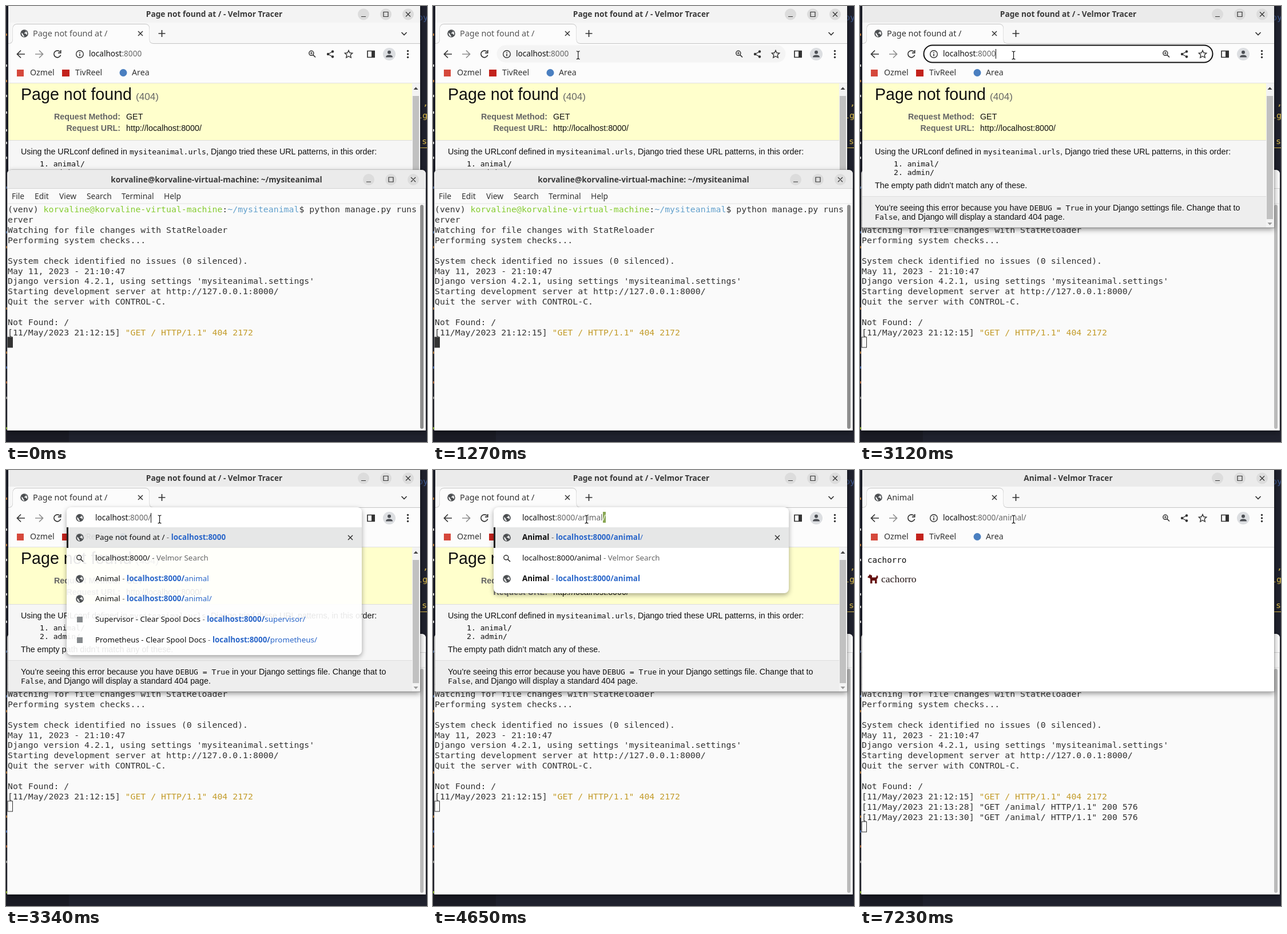
Write an HTML page that moves like this. It is 736x761 px and loops after 8000 ms.

```html
<!DOCTYPE html>
<html lang="en">
<head>
<meta charset="utf-8">
<title>Page not found</title>
<style>
html, body { margin: 0; width: 100%; height: 100%; overflow: hidden; background: #20222e; }
#stage { position: relative; width: 736px; height: 761px; overflow: hidden; font-family: "Noto Sans", sans-serif; }
#stage > svg, .win, .win > svg { position: absolute; left: 0; top: 0; width: 736px; height: 761px; }
text { white-space: pre; fill: #333; }
.ui { font-size: 13.8px; }
.mark { font-size: 14.2px; }
.title { font-size: 13.7px; font-weight: 700; text-anchor: middle; fill: #3a3a3a; }
.tab { font-size: 14.4px; }
.page { font: 14.3px "Liberation Sans", sans-serif; fill: #111; }
.label { font-weight: 700; fill: #666; text-anchor: end; }
.code { font: 13.1px "DejaVu Sans Mono", monospace; fill: #111; }
.term { font: 14.85px "DejaVu Sans Mono", monospace; fill: #333; }
.line { fill: none; stroke: #333; stroke-width: 1.7; }
.shadow { stroke: rgba(0, 0, 0, .25); filter: drop-shadow(0 3px 5px rgba(0, 0, 0, .42)); }
#animalName { font: 17.6px "Liberation Serif", serif; fill: #201010; }
#address { position: absolute; top: 74px; line-height: 18px; font-size: 13.6px; white-space: pre; color: #666; }
#address em { font-style: normal; color: #111; }
#address mark { background: #88a653; color: #fff; }
#address mark em { color: #fff; }
#address i { display: inline-block; width: 1px; height: 17px; margin-right: -1px; background: #111; vertical-align: -4px; }
#drop { position: absolute; left: 106px; top: 65px; width: 516px; border-radius: 8px; box-shadow: 0 3px 9px rgba(0, 0, 0, .35); overflow: hidden; }
#rows { position: absolute; top: 35px; width: 100%; }
#rows div { position: relative; height: 35.8px; line-height: 35px; padding-left: 50px; font-size: 13.4px; color: #111; white-space: pre; }
#rows div:first-child { background: rgba(30, 40, 40, .11); box-shadow: inset 3px 0 #222; }
#rows svg { position: absolute; left: 15px; top: 10px; width: 16px; height: 16px; overflow: visible; }
#rows svg + svg { left: 488px; }
#rows s { color: #666; text-decoration: none; }
#rows u { color: #2a66c9; text-decoration: none; }
#pointer { z-index: 3; overflow: visible; }
</style>
</head>
<body>
<div id="stage"></div>
<script>
const LOOP = 8000;
const USER = 'korvaline';
const BROWSER = 'Velmor Tracer';
const SEARCH = 'Velmor Search';
const HOST = 'localhost:8000/';

const text = (x, y, body, cls = 'ui', extra = '') => `<text x="${x}" y="${y}" class="${cls}" ${extra}>${body}</text>`;
const rect = (x, y, w, h, fill, extra = '') => `<rect x="${x}" y="${y}" width="${w}" height="${h}" fill="${fill}" ${extra}/>`;
const line = (d, extra = '') => `<path class="line" d="${d}" ${extra}/>`;
const dot = (x, y, r, fill) => `<circle cx="${x}" cy="${y}" r="${r}" fill="${fill}"/>`;
const icon = (id, x, y) => `<use href="#${id}" x="${x}" y="${y}"/>`;
const span = (fill, body) => `<tspan style="fill:${fill}">${body}</tspan>`;
const code = body => `<tspan class="code">${body}</tspan>`;

const windowButtons = (x, y) => [0, 39, 78].map(dx => dot(x + dx, y, 10, '#dcdcdc')).join('') +
  line(`M${x - 4} ${y + 4}h8M${x + 35} ${y - 4}h8v8h-8zM${x + 74} ${y - 4}l8 8m0-8l-8 8`, 'style="stroke-width:1.2"');

const symbols = `<defs>
  <g id="globe">${dot(0, 0, 6.8, '#4c4f52')}
    <path fill="#f4f4f4" d="M-4.8-1.5l3 2.6v1.6l1.6 1v2Q-5 4.8-4.8-1.5zM0-5.3l3.2.9-.6 2-2.3 1v1.6h2.5l1 2.4 1-.8Q6.4-3.5 0-5.3z"/></g>
  <g id="lens"><circle class="line" cx="-1.2" cy="-1.2" r="4" style="stroke-width:1.5"/>${line('M1.8 1.8L6 6')}</g>
  <g id="cross">${line('M-4-4L4 4M4-4L-4 4', 'style="stroke-width:1.5"')}</g>
  <g id="doc">${rect(-5, -5, 10, 10, '#85898c')}</g>
  <g id="info"><circle class="line" r="6.3" style="stroke-width:1.4"/>${line('M0-3.5v1.7M0-.6v4.1')}</g>
</defs>`;

// Slivers of the editor behind the two windows
const slivers = [[50, '#c8823c'], [104, '#ddd'], [131, '#c8823c'], [157, '#ddd'], [186, '#ddd'], [217, '#ddd'],
  [239, '#ddd'], [265, '#ddd'], [317, '#5b7fb8'], [395, '#5b7fb8'], [421, '#c8823c'], [528, '#c8823c'],
  [605, '#c8823c'], [631, '#4a78d0'], [657, '#c8703c'], [684, '#aaa'], [737, '#9cc832']];
const backdrop = `<svg>${symbols}${rect(0, 0, 736, 761, '#20222e')}${rect(0, 741, 110, 20, '#1b1c25')}
  ${slivers.map(([y, color]) => rect(0, y - 2, 2, 4, color)).join('')}
  ${text(720, 25, span('#3e5a92', 'py'), 'term')}
  ${[[729, 174, ','], [719, 196, 'lg'], [727, 241, 'so']].map(([x, y, s]) => text(x, y, span('#e0c04c', s), 'term')).join('')}
  ${rect(724, 247, 12, 1, '#e0c04c')}</svg>`;

const tabEdge = 'M4 65.5Q12 65.5 12 58V39Q12 31.5 20 31.5H243Q250.5 31.5 250.5 39V58Q250.5 65.5 258 65.5';
const toolbar = `
  ${rect(4, 29, 720, 37, '#f8f8f8')}${rect(4, 65, 720, 70, '#fcfcfc')}
  <path d="${tabEdge}H724" fill="none" stroke="#c4c4c4"/><path d="${tabEdge}" fill="#fcfcfc" transform="translate(0 1)"/>
  ${icon('globe', 32, 48)}${icon('cross', 235, 48)}
  ${line('M266.5 48h12M272.5 42v12M691.5 46l4.5 4.5 4.5-4.5')}
  ${line('M33 84H20M26 77.5L19.5 84L26 90.5')}${line('M51 84H64M58 77.5L64.5 84L58 90.5', 'style="stroke:#8e8e8e"')}
  ${line('M94.5 80A6 6 0 1 0 95.6 85.5M95.7 77v4.8h-4.8')}
  <g id="addressBar"><rect id="pill" x="111.5" y="68.5" width="505" height="30" rx="15" stroke-width="2"/>
    ${icon('info', 129, 84)}
    ${icon('lens', 535, 83.5)}${line('M531.6 82.3h4.4M533.8 80.1v4.4', 'style="stroke-width:1.1"')}
    ${dot(563, 84, 2.2, '#333')}${dot(571, 79.5, 2.2, '#333')}${dot(571, 88.5, 2.2, '#333')}
    ${line('M571 79.5L563 84L571 88.5', 'style="stroke-width:1.3"')}
    ${line('M599 77.5l2 4.3 4.7.5-3.5 3.2 1 4.6-4.2-2.4-4.2 2.4 1-4.6-3.5-3.2 4.7-.5z', 'style="stroke-width:1.4"')}</g>
  ${line('M632 78.5h12v11h-12z')}${rect(639, 78, 6, 12, '#333')}
  ${dot(670, 84, 11, '#dcdee1')}${dot(670, 80.7, 3, '#4c4f54')}<path d="M664 89.5Q664 85.5 670 85.5T676 89.5z" fill="#4c4f54"/>
  ${[78.5, 84, 89.5].map(y => dot(702.5, y, 1.7, '#333')).join('')}
  ${rect(19, 111, 12, 12, '#d5483b')}${text(42, 121, 'Ozmel', 'mark')}
  ${rect(98, 111, 13, 12, '#c3221c')}${text(121, 121, 'TivReel', 'mark')}
  ${dot(205, 116.5, 6.5, '#4a7fc0')}${text(220, 121, 'Area', 'mark')}
  ${rect(4, 134.5, 720, 1, '#c8c8c8')}`;

const errorPage = `<g id="errorPage">
  ${rect(4, 135, 706, 99, '#ffffcc')}${rect(4, 234, 706, 1, '#ddd')}
  ${rect(4, 235, 706, 97, '#f6f6f6')}${rect(4, 332, 706, 1, '#ddd')}${rect(4, 333, 706, 54, '#eee')}
  ${rect(710, 135, 14, 252, '#f3f3f3')}${rect(711, 157, 11, 215, '#c1c1c1')}
  <path d="M712.5 146h8l-4-4.5z" fill="#444"/><path d="M712.5 378h8l-4 4.5z" fill="#999"/>
  ${text(26, 164, 'Page not found', 'page', 'style="font-size:28.6px"')}
  ${text(227, 164, '(404)', 'page', 'style="font-size:17.16px;fill:#666"')}
  ${text(200, 198, 'Request Method:', 'page label')}${text(210, 198, 'GET', 'page')}
  ${text(200, 218, 'Request URL:', 'page label')}${text(210, 218, 'http://localhost:8000/', 'page')}
  ${text(26, 259, `Using the URLconf defined in ${code('mysiteanimal.urls')}, Django tried these URL patterns, in this order:`, 'page')}
  ${text(59, 280, '1. animal/', 'code')}${text(59, 295, '2. admin/', 'code')}
  ${text(26, 318, 'The empty path didn’t match any of these.', 'page')}
  ${text(26, 357, `You’re seeing this error because you have ${code('DEBUG = True')} in your Django settings file. Change that to`, 'page')}
  ${text(26, 373, `${code('False')}, and Django will display a standard 404 page.`, 'page')}</g>`;

const animalPage = `<g id="animalPage">${rect(4, 135.5, 720, 252, '#fff')}
  ${text(13, 162, 'cachorro', 'code', 'style="font-size:14.2px"')}
  ${text(24, 196, 'cachorro', '', 'id="animalName"')}
  <path id="dog" fill="#651212" d="M13.5 187.5q-.5-2 1.5-2.5l2-3 2 1.5 2 .5v3.5h6.5q1.5-.5 1.5-3.5 2.5 0 2.5 2.5 0 2.5-2 3.5v8h-3.5v-5h-4.5v5h-3.5v-7.5l-1-2q-3 0-3.5-1z"/></g>`;

const browser = `<div class="win" id="browser"><svg>
  ${rect(4, -12, 720, 399, '#fff', 'class="shadow"')}<rect id="titleBar" x="4" width="720" height="29"/>
  ${text(364, 19, '', 'title', 'id="pageTitle"')}${windowButtons(625, 14.5)}
  ${toolbar}${text(47, 53, '', 'tab', 'id="tabTitle"')}${errorPage}${animalPage}
  ${rect(4, 386.5, 720, 1, '#9a9a9a')}</svg>
  <div id="drop"><div id="rows"></div></div><div id="address"></div>
  <svg id="dropIcon">${icon('globe', 129, 83.5)}</svg></div>`;

const termLines = [
  `(venv) ${span('#85cc30', `${USER}@${USER}-virtual-machine`)}:${span('#62a0cc', '~/mysiteanimal')}$ python manage.py runs`,
  'erver', 'Watching for file changes with StatReloader', 'Performing system checks...', '',
  'System check identified no issues (0 silenced).', 'May 11, 2023 - 21:10:47',
  "Django version 4.2.1, using settings 'mysiteanimal.settings'",
  'Starting development server at http://127.0.0.1:8000/', 'Quit the server with CONTROL-C.', '', 'Not Found: /',
  `[11/May/2023 21:12:15] ${span('#c39c2a', '"GET / HTTP/1.1" 404 2172')}`,
  '[11/May/2023 21:13:28] "GET /animal/ HTTP/1.1" 200 576',
  '[11/May/2023 21:13:30] "GET /animal/ HTTP/1.1" 200 576'];
const termY = row => 360 + row * 17.92;
const menu = [[10, 'File'], [50, 'Edit'], [93, 'View'], [141, 'Search'], [202, 'Terminal'], [276, 'Help']];

const terminal = `<div class="win" id="terminal"><svg>
  <path class="shadow" d="M2 741V294Q2 286 10 286H726Q734 286 734 294V741z" fill="#fafafa"/>
  <path id="termBar" d="M2 318V294Q2 286 10 286H726Q734 286 734 294V318z"/>
  ${rect(2, 318, 732, 1, '#d4d4d4')}${rect(2, 344.5, 732, 1, '#e2e2e2')}
  ${text(368, 307.5, `${USER}@${USER}-virtual-machine: ~/mysiteanimal`, 'title')}${windowButtons(634, 303)}
  ${menu.map(([x, s]) => text(x, 337, s)).join('')}
  ${termLines.map((s, i) => text(3, termY(i).toFixed(1), s, 'term', `id="term${i}"`)).join('')}
  <rect id="termCursor" x="3" width="8.5" height="18" stroke="#333"/>
  <rect id="termScroll" x="724" y="347" width="6" height="391" rx="3"/></svg></div>`;

const beam = 'M-3-7Q0-7 0-5V5Q0 7-3 7M3-7Q0-7 0-5M0 5Q0 7 3 7';
const pointer = `<svg id="pointer">
  <path id="hand" d="M-2 14V1.5Q-2-.5 0-.5T2 1.5V8Q4 7 5.5 8.5Q7.5 8 8.5 9.5Q11.5 9 11.5 12V16Q11 19 9 22.5H-.5Q-3 17-6 13.5Q-6.5 10.5-4 11.5zM2 8v4M5.5 8.5v4M8.5 9.5v3" fill="#fff" stroke="#111" stroke-width="1.2"/>
  <path id="arrow" d="M0 0V17L4 13.5L6.5 19.5L9 18.5L6.5 12.5H12z" fill="#111" stroke="#fff"/>
  <g id="beam" fill="none"><path d="${beam}" stroke="#fff" stroke-width="3"/><path d="${beam}" stroke="#111" stroke-width="1.2"/></g></svg>`;

document.getElementById('stage').innerHTML = backdrop + browser + terminal + pointer;
const $ = id => document.getElementById(id);
const show = (id, on) => { $(id).style.display = on ? '' : 'none'; };
const fill = (id, color) => { $(id).style.fill = color; };
const setHtml = (id, html) => { const el = $(id); if (el.shown !== html) el.innerHTML = el.shown = html; };

// Last value in a [time, value] table whose time has come
const at = (table, t) => table.reduce((value, [time, next]) => t >= time ? next : value, table[0][1]);

const RAISE = 1510, SELECT = 1590, OPEN = 3290, LOAD = 5480, RELOAD = 7140, DOG = 7190;
const typed = [[OPEN, ''], [3500, 'a'], [3600, 'an'], [3700, 'ani'], [3870, 'anim'], [4030, 'anima'], [4650, 'animal']];
const dropFade = [[0, 0], [OPEN, .45], [3340, .9], [3380, 1], [LOAD, .13], [5530, 0]];
const path = [[100, 672, 750], [220, 638, 708], [350, 560, 635], [510, 335, 430], [620, 222, 180], [720, 195, 98],
  [750, 193, 94], [880, 196, 90], [920, 206, 85], [1100, 238, 83], [1350, 261, 87], [1840, 261, 87], [1920, 268.5, 86]];

function position(t) {
  const i = path.findIndex(p => p[0] > t);
  if (i < 0) return path.at(-1).slice(1);
  const [t0, x0, y0] = path[i - 1], [t1, x1, y1] = path[i], k = (t - t0) / (t1 - t0);
  return [x0 + (x1 - x0) * k, y0 + (y1 - y0) * k];
}

function suggestions(part) {
  const bold = (s, n) => `<b>${s.slice(0, n)}</b>${s.slice(n)}`;
  const page = (name, url) => `${bold(name, name === 'Animal' ? part.length : 0)}<s> - </s><u>${bold(HOST + url, HOST.length + part.length)}</u>`;
  const search = ['lens', `${HOST + part}<s> - ${SEARCH}</s>`];
  if (!part) return [['globe', 'Page not found at /<s> - </s><u><b>localhost:8000</b></u>'], search,
    ['globe', page('Animal', 'animal')], ['globe', page('Animal', 'animal/')],
    ['doc', page('Supervisor - Clear Spool Docs', 'supervisor/')], ['doc', page('Prometheus - Clear Spool Docs', 'prometheus/')]];
  const rows = [['globe', page('Animal', 'animal/')], search, ['globe', page('Animal', 'animal')]];
  if (part !== 'animal') rows.splice(2, 0, ['globe', `<u><b>${HOST + part}</b></u>`]);
  return rows;
}

function address(t) {
  const host = '<em>localhost</em>:8000';
  if (t >= LOAD) return host + '/animal/';
  if (t >= OPEN) {
    const part = at(typed, t);
    return `${host}/${part}` + (part ? `<mark>${'animal/'.slice(part.length)}</mark>` : '<i></i>');
  }
  if (t >= 2130) return host + (t < 2630 || t >= 3120 ? '<i></i>' : '');
  return t >= SELECT ? `<mark>${host}</mark>` : host;
}

function drawBrowser(t) {
  const loaded = t >= LOAD, open = t >= OPEN && !loaded, focused = t >= RAISE && !loaded;
  const name = loaded ? 'Animal' : 'Page not found at /';
  setHtml('pageTitle', `${name} - ${BROWSER}`);
  setHtml('tabTitle', name);
  fill('titleBar', t < RAISE ? '#f3f3f3' : '#ebebeb');
  fill('tabTitle', t < RAISE ? '#555' : '#333');
  show('errorPage', !loaded);
  show('animalPage', loaded);
  show('dog', t >= DOG);
  $('animalName').setAttribute('x', t >= DOG ? 37 : 24);
  fill('pill', focused ? '#fff' : t >= 960 && !loaded ? '#f4f4f4' : 'none');
  $('pill').style.stroke = focused ? '#111' : 'none';
  show('addressBar', !open);
  show('dropIcon', open);
  setHtml('address', address(t));
  $('address').style.left = (open ? 156 : 145) + 'px';

  const rows = suggestions(at(typed, t)), fade = at(dropFade, t);
  show('drop', fade > 0);
  $('drop').style.opacity = open ? 1 : fade;
  $('drop').style.background = `rgba(255,255,255,${open ? fade : 1})`;
  $('drop').style.height = 43 + rows.length * 35.8 + 'px';
  setHtml('rows', rows.map(([id, label], i) => `<div><svg>${icon(id, 8, 8)}</svg>` +
    (i ? '' : `<svg>${icon('cross', 8, 8)}</svg>`) + `${label}</div>`).join(''));
}

function drawTerminal(t) {
  const active = t < RAISE, row = at([[0, 13], [LOAD, 14], [RELOAD, 15]], t);
  $('terminal').style.zIndex = active ? 2 : 0;
  $('browser').style.zIndex = 1;
  fill('termBar', active ? '#ebebeb' : '#fafafa');
  fill('termScroll', active ? '#8e8e8e' : '#bababa');
  show('term13', row > 13);
  show('term14', row > 14);
  show('termCursor', !active || t < 500 || t >= 1100);
  $('termCursor').setAttribute('y', termY(row) - 15);
  fill('termCursor', active ? '#333' : '#fafafa');
}

function drawPointer(t) {
  show('pointer', t >= 100);
  if (t < 100) return;
  const [x, y] = position(t);
  const kind = t >= 920 || y > 345 ? 'beam' : y > 136 ? 'arrow' : 'hand';
  for (const id of ['beam', 'arrow', 'hand']) show(id, id === kind);
  $('pointer').style.transform = `translate(${x}px,${y}px)`;
}

function frame() {
  const t = performance.now() % LOOP;
  drawBrowser(t);
  drawTerminal(t);
  drawPointer(t);
  requestAnimationFrame(frame);
}
frame();
</script>
</body>
</html>
```
